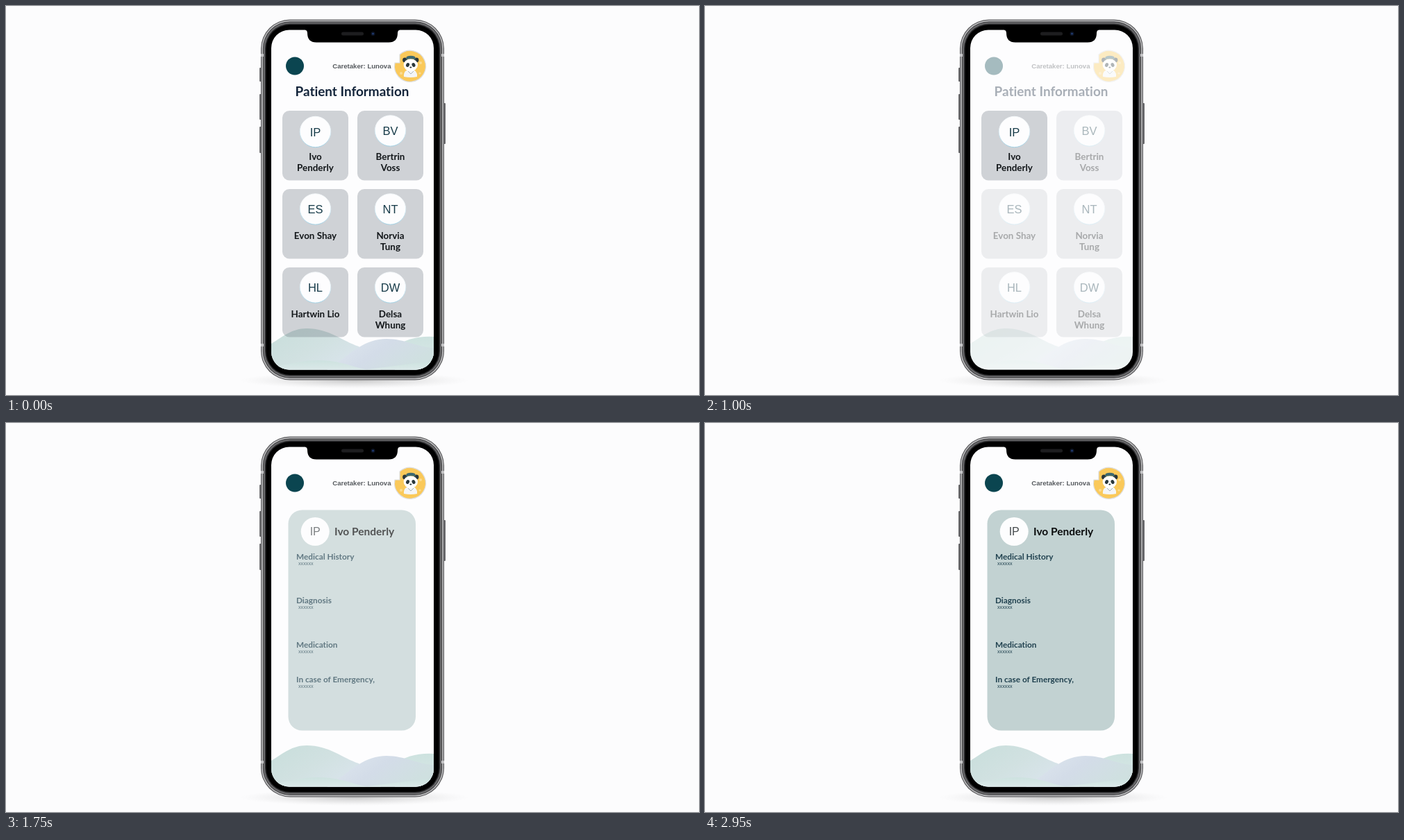
An HTML page that plays this animation: 998x561 px, repeating every 3 s.

```html
<!DOCTYPE html>
<html lang="en">
<head>
<meta charset="utf-8">
<title>Patient information</title>
<style>
html, body { margin: 0; width: 100%; height: 100%; overflow: hidden; background: #fcfcfd; }
svg { display: block; width: 100vw; height: 100vh; }
text { font-family: Lato, "Open Sans", sans-serif; font-weight: 700; font-variant-ligatures: none; }
.mid { text-anchor: middle; }
.plain { font-family: "Liberation Sans", Arial, sans-serif; font-weight: 400; }
.name { font-size: 13.4px; fill: #121619; }
.initials { font-size: 16.5px; fill: #173b49; }
.label { font-size: 11.8px; fill: #20414f; }
.note { font-size: 7.2px; fill: #20414f; }
</style>
</head>
<body>
<svg viewBox="0 0 998 561">
  <defs>
    <linearGradient id="hill" x1="0" y1="0" x2="1" y2=".6">
      <stop offset="0" stop-color="#c8dedb"/><stop offset=".5" stop-color="#d1e1e1"/><stop offset="1" stop-color="#dbe5ee"/>
    </linearGradient>
    <linearGradient id="midHill" x1="0" y1="0" x2="1" y2=".4">
      <stop offset="0" stop-color="#dfe8ef"/><stop offset=".55" stop-color="#d3dce8"/><stop offset="1" stop-color="#cfe0e0"/>
    </linearGradient>
    <linearGradient id="frontHill" x1="0" y1="0" x2="0" y2="1">
      <stop offset="0" stop-color="#cde2df"/><stop offset="1" stop-color="#dbe9e9"/>
    </linearGradient>
    <linearGradient id="ring" x1="0" y1="0" x2="0" y2="1">
      <stop offset=".3" stop-color="#f4f8fa"/><stop offset="1" stop-color="#9fd0e4"/>
    </linearGradient>
    <radialGradient id="shade">
      <stop offset="0" stop-color="#888" stop-opacity=".45"/><stop offset=".6" stop-color="#aaa" stop-opacity=".2"/><stop offset="1" stop-color="#ccc" stop-opacity="0"/>
    </radialGradient>
    <clipPath id="screen"><rect x="382" y="34.5" width="234" height="490" rx="26"/></clipPath>
  </defs>

  <ellipse cx="502" cy="540" rx="165" ry="12" fill="url(#shade)"/>
  <g id="phone"></g>

  <g clip-path="url(#screen)">
    <rect x="382" y="34" width="234" height="491" fill="#fdfdfe"/>
    <g id="base">
      <path d="M560 525V492Q582 475 616 477V525Z" fill="url(#frontHill)"/>
      <path d="M382 487C400 476 412 465 433 465C465 465 484 483 508 491L540 525H382Z" fill="url(#hill)"/>
      <path d="M462 525C490 508 512 480 548 480C574 480 592 492 616 493V525Z" fill="url(#midHill)"/>
      <path d="M382 520C405 518 424 511 450 511C478 511 492 518 520 525H382Z" fill="url(#frontHill)"/>
      <path d="M510 525C545 522 580 515 616 513V525Z" fill="url(#frontHill)"/>
      <circle cx="416" cy="86.5" r="13" fill="#0b4550"/>
      <text class="plain" x="554.5" y="90" text-anchor="end" style="font-weight:700" font-size="9.6" fill="#575b5f">Caretaker: Lunova</text>
      <g id="avatar">
        <path d="M567 82H560A22.5 22.5 0 1 0 567 70Z" fill="#fac95a" stroke="#dedfe0" stroke-width="1.2"/>
        <g fill="#fbdc92"><circle cx="569" cy="97" r="2"/><circle cx="597" cy="82" r="2"/><circle cx="596" cy="97" r="1.6"/></g>
        <path d="M573 102Q572 92 583 91Q593 92 592 102Q583 104 573 102Z" fill="#f4f5f6"/>
        <g fill="#29363a"><circle cx="574.5" cy="78" r="3.4"/><circle cx="591" cy="78" r="3.4"/></g>
        <ellipse cx="582.8" cy="85" rx="10.2" ry="8.8" fill="#fff"/>
        <path d="M575.5 77.5L577 73Q583 70.5 589 73L590 77.5Q583 75 575.5 77.5Z" fill="#3c6870"/>
        <g fill="#29363a">
          <ellipse cx="578.5" cy="85" rx="2.4" ry="3" transform="rotate(25 578.5 85)"/>
          <ellipse cx="587" cy="85" rx="2.4" ry="3" transform="rotate(-25 587 85)"/>
          <ellipse cx="582.8" cy="88.5" rx="1.5" ry="1"/>
        </g>
        <path d="M579 94L583 98L587 94" fill="none" stroke="#a9b4b8"/>
      </g>
    </g>
    <g id="list"><text class="mid" x="498.5" y="130" font-size="18.9" fill="#14253b">Patient Information</text></g>
    <g id="chosen"></g>
    <g id="detail"></g>
  </g>

  <path d="M428 33.5Q434 34 434 39Q434 52.5 447 52.5H551Q564 52.5 564 39Q564 34 570 33.5Z" fill="#000"/>
  <rect x="483" y="37.5" width="32" height="5" rx="2.5" fill="#1d1d1f"/>
  <circle cx="528.5" cy="40" r="3" fill="#0d1424"/><circle cx="528.5" cy="40" r="1.3" fill="#23407c"/>
</svg>
<script>
const $ = id => document.getElementById(id);
const add = (id, markup) => $(id).insertAdjacentHTML('beforeend', markup);
const rect = (x, y, w, h, r, fill) =>
  `<rect x="${x}" y="${y}" width="${w}" height="${h}" rx="${r}" fill="${fill}"/>`;
const text = (cls, x, y, s, more = '') => `<text class="${cls}" x="${x}" y="${y}" ${more}>${s}</text>`;

// Phone body: side buttons, then nested shells
for (const [x, y, h] of [[365, 89, 20], [365, 127, 37], [365, 174, 38], [630, 140, 59]])
  add('phone', rect(x, y, 3, h, 1, '#6a6a6d'));
for (const [inset, fill] of [[0, '#5c5c5e'], [1.2, '#c0c0c2'], [2.8, '#4a4a4c'], [4.2, '#6c6c6e'], [6, '#2c2c2e'], [7.5, '#000']])
  add('phone', rect(367 + inset, 19.5 + inset, 264 - 2 * inset, 520 - 2 * inset, 42 - inset, fill));
for (const x of [367, 627]) for (const y of [69, 487])
  add('phone', rect(x, y, 4, 4, 0, '#c4c4c6'));

const people = ['Ivo Penderly', 'Bertrin Voss', 'Evon Shay', 'Norvia Tung', 'Hartwin Lio', 'Delsa Whung'];
const initials = name => name.split(' ').map(w => w[0]).join('');

people.forEach((name, i) => {
  const x = 398 + i % 2 * 108, y = 151 + (i >> 1) * 113, cx = x + 47.5;
  const cy = y + (i ? 29 : 30.5);
  const lines = i === 2 || i === 4 ? [name] : name.split(' ');
  add(i ? 'list' : 'chosen',
    rect(x, y, 95, 100.5, 10, 'rgba(100,110,120,.3)') +
    `<circle cx="${cx}" cy="${cy}" r="22.2" fill="#fdfdfe" stroke="url(#ring)"/>` +
    text('mid plain initials', cx, cy + 6, initials(name)) +
    lines.map((s, k) => text('mid name', cx, y + 71 + (i > 1 ? 1 : 0) + k * 16, s)).join(''));
});

add('detail', rect(406.5, 125.5, 183.5, 318, 20, '#c2d2d2') +
  '<circle cx="445.2" cy="156.5" r="20.5" fill="#fdfdfe"/>' +
  text('mid plain', 445.2, 162, initials(people[0]), 'font-size="16" fill="#454a4d"') +
  text('', 473, 162, people[0], 'font-size="15.5" fill="#0a0c0d"'));
[['Medical History', 197], ['Diagnosis', 260], ['Medication', 324], ['In case of Emergency,', 374]]
  .forEach(([s, y]) => add('detail', text('label', 418, y, s) + text('plain note', 421, y + 8, 'xxxxxx')));

const ramp = (t, from, to) => Math.min(1, Math.max(0, (t - from) / (to - from)));
const show = (id, a) => $(id).setAttribute('opacity', a);

function draw(now) {
  const t = Math.floor(now % 3000 / 50) * 50;
  const dim = 1 - 0.64 * (1 - (1 - ramp(t, 0, 400)) ** 2);
  const swap = ramp(t, 1100, 1450);
  show('base', dim + (1 - dim) * swap);
  show('list', dim * (1 - swap));
  show('chosen', 1 - swap);
  show('detail', ramp(t, 1400, 1900));
  requestAnimationFrame(draw);
}
draw(performance.now());
</script>
</body>
</html>
```
